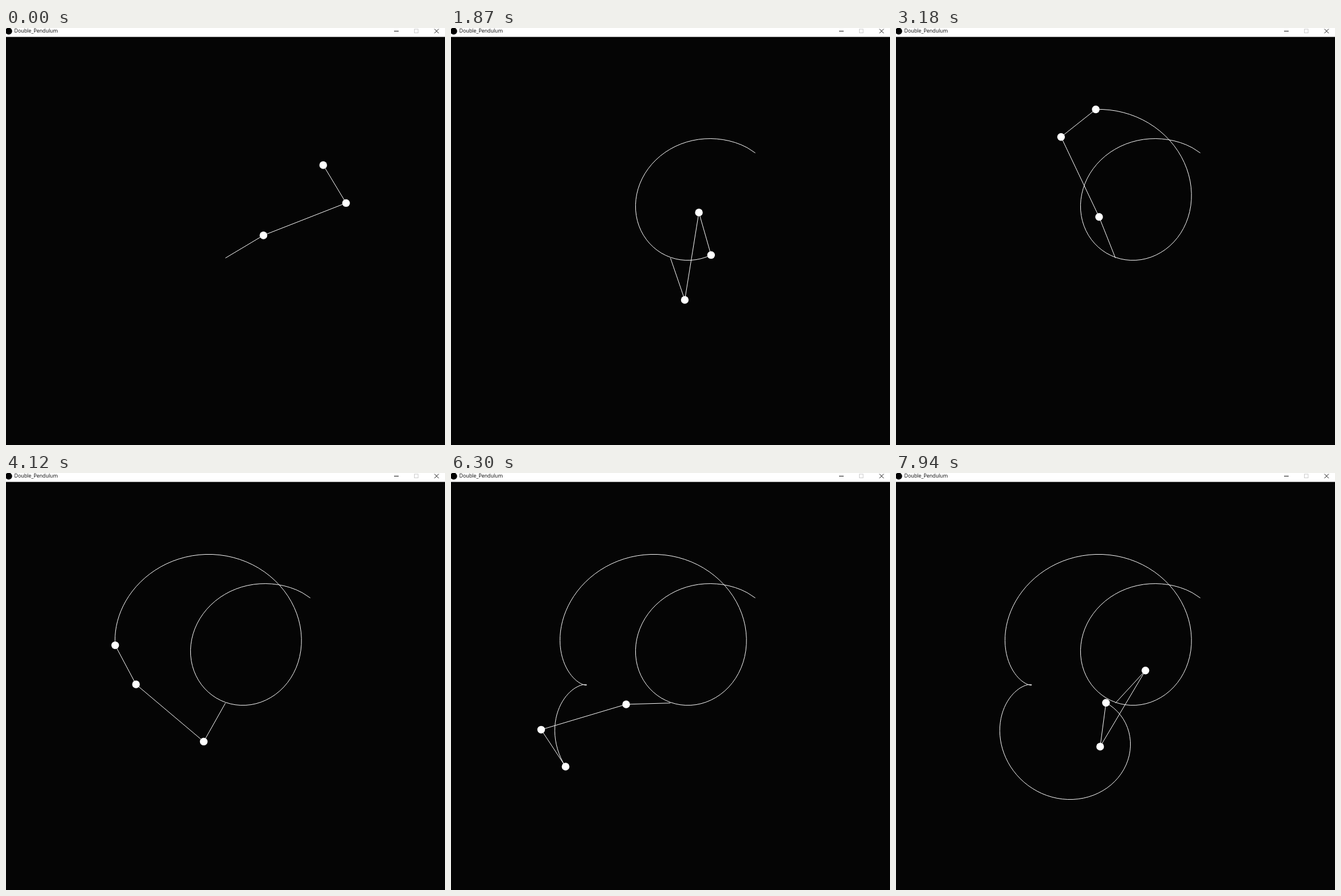
Animation of 767x730 px, one loop 8 s. Source, as an HTML page:

```html
<!DOCTYPE html>
<html lang="en">
<head>
<meta charset="utf-8">
<title>Double_Pendulum</title>
<style>
  html, body { margin: 0; width: 100%; height: 100%; overflow: hidden; background: #050505; }
  svg { display: block; width: 767px; height: 730px; }
  text { font: 8.8px "Open Sans", "Noto Sans", sans-serif; }
</style>
</head>
<body>
<svg viewBox="0 0 767 730">
  <rect width="767" height="730" fill="#050505"/>
  <g fill="none" stroke="#fff">
    <path id="trail" stroke-linejoin="round"/>
    <path id="arms"/>
  </g>
  <g id="bobs" fill="#fff">
    <circle r="6.7"/><circle r="6.7"/><circle r="6.7"/>
  </g>
  <rect width="767" height="15.6" fill="#fff"/>
  <circle cx="4.7" cy="5.5" r="6" fill="#000"/>
  <text x="14.6" y="8.4">Double_Pendulum</text>
  <g fill="none" stroke="#111">
    <path d="M678 5.5h8"/>
    <rect x="713.5" y="2" width="6.5" height="6.5" stroke="#ccc"/>
    <path d="M748.5 1.7l7.5 7.5M756 1.7l-7.5 7.5"/>
  </g>
</svg>
<script>
  const LOOP = 8000, STEP = 77.8, LEAD = 10;
  const PIVOT = [383.4, 402.7];

  // angles in degrees, speed in degrees per step;
  // lag is how far an arm trails behind at first
  const ARMS = [
    { length: 77.4, angle: 30.9, speed: 10.75, lag: 0 },
    { length: 155, angle: 32.1, speed: 2.0315, lag: 10.7 },
    { length: 77.5, angle: 127, speed: 6.622, lag: 6 }
  ];

  function joints(step) {
    let [x, y] = PIVOT;
    return ARMS.map(({ length, angle, speed, lag }) => {
      const a = (angle + speed * step - lag * Math.exp(-2.5 * step)) * Math.PI / 180;
      x += length * Math.cos(a);
      y -= length * Math.sin(a);
      return [x, y];
    });
  }

  const path = points =>
    points.length ? "M" + points.map(p => p.map(v => v.toFixed(2)).join(" ")).join("L") : "";

  function trailTo(step) {
    const points = [];
    for (let s = 0.5; s <= step; s += 0.5) points.push(joints(s)[2]);
    return path(points);
  }

  const trail = document.getElementById("trail");
  const arms = document.getElementById("arms");
  const bobs = document.querySelectorAll("#bobs circle");
  let shown = -1;

  function draw(time) {
    const step = Math.floor((time + LEAD) / STEP);
    if (step === shown) return;
    shown = step;
    const pose = joints(step);
    trail.setAttribute("d", trailTo(step));
    arms.setAttribute("d", path([PIVOT, ...pose]));
    pose.forEach(([x, y], i) => {
      bobs[i].setAttribute("cx", x);
      bobs[i].setAttribute("cy", y);
    });
  }

  const start = performance.now();
  function tick() {
    draw((performance.now() - start) % LOOP);
    requestAnimationFrame(tick);
  }
  tick();
</script>
</body>
</html>
```
